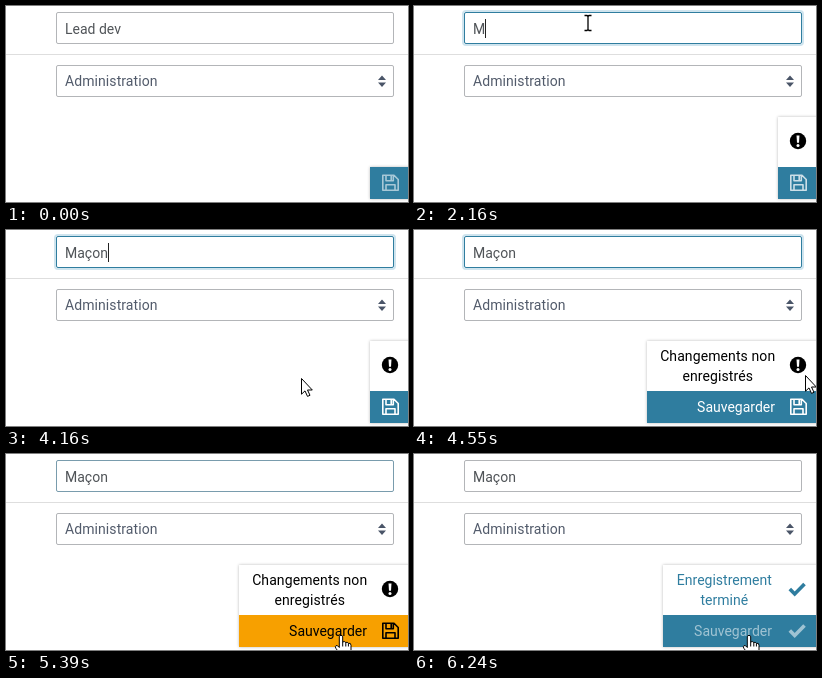
An HTML page for the animation above (7.63 s loop, 402 by 196 pixels).

```html
<!DOCTYPE html>
<html lang="fr">
<head>
<meta charset="utf-8">
<title>Formulaire</title>
<style>
  html, body { margin: 0; width: 100%; height: 100%; overflow: hidden; background: #fff; }
  svg { display: block; width: 402px; height: 196px; }
  text { font: 14px Roboto, Arial, sans-serif; white-space: pre; }
  .mid { text-anchor: middle; }
  .end { text-anchor: end; }
  .shade { filter: drop-shadow(0 0 1.5px rgba(0, 0, 0, .28)); }
</style>
</head>
<body>
<svg viewBox="0 0 402 196">
  <defs>
    <clipPath id="clip"><rect id="clipBox" y="100" width="402" height="96"/></clipPath>
  </defs>
  <path d="M0 48.5H402" stroke="#dedede"/>

  <rect id="glow" x="49" y="5" width="340" height="34" rx="3" fill="none" stroke="#cfe4ee" stroke-width="2"/>
  <rect id="field" x="50.5" y="6.5" width="337" height="31" rx="1.5" fill="#fff"/>
  <rect id="mark" x="59" y="13" width="56" height="19" fill="#0078d7"/>
  <text id="job" x="59" y="28"></text>
  <rect id="caret" y="13" width="1" height="19" fill="#222"/>

  <rect x="50.5" y="59.5" width="337" height="31" rx="1.5" fill="#fff" stroke="#b3b5b8"/>
  <text x="59" y="80" fill="#525b6b" letter-spacing=".08">Administration</text>
  <path d="M372 74L376 69.5L380 74zM372 76.5H380L376 81z" fill="#4a5568"/>

  <g class="shade">
    <rect id="panel" y="111" height="50" fill="#fff"/>
    <rect id="bar" y="161" height="32"/>
  </g>
  <g clip-path="url(#clip)">
    <g id="warn">
      <g fill="#000" letter-spacing=".1">
        <text class="mid" x="303.7" y="131">Changements non</text>
        <text class="mid" x="303.7" y="151">enregistrés</text>
      </g>
      <circle cx="384" cy="135" r="8.2"/>
      <path d="M382.5 129.5H385.5L385 136.7H383z" fill="#fff"/>
      <circle cx="384" cy="139.4" r="1.5" fill="#fff"/>
    </g>
    <g id="done" fill="#2f7d9f">
      <text class="mid" x="310.3" y="131">Enregistrement</text>
      <text class="mid" x="310.3" y="151">terminé</text>
      <path d="M375.8 135L380.7 140L390.5 130" fill="none" stroke="#2f7d9f" stroke-width="3.6"/>
    </g>
    <g id="action">
      <text id="label" class="end" y="182">Sauvegarder</text>
      <path id="disk" fill="none" stroke-width="1.6" stroke-linejoin="round"
        d="M376.8 169.3H388L392.2 173.5V184.2H376.8zM380 169.5V174.8H387.3V169.5M380 184V178.8H389V184M385.2 170V174"/>
      <path id="tick" d="M375.8 176.5L380.7 181.5L390.5 171.5" fill="none" stroke-width="3.6"/>
    </g>
  </g>

  <g id="mouse">
    <path id="arrow" d="M.5 .5V16.2L4 12.9L6.5 18.4L9 17.3L6.5 12H11.3z" fill="#fff" stroke="#000"/>
    <g id="beam" fill="none">
      <path d="M-4 -7.5H-1L0 -6.5L1 -7.5H4M0 -7V7M-4 7.5H-1L0 6.5L1 7.5H4" stroke="#fff" stroke-width="3"/>
      <path d="M-3.5 -7.5H-1L0 -6.5L1 -7.5H3.5M0 -7V7M-3.5 7.5H-1L0 6.5L1 7.5H3.5" stroke="#000" stroke-width="1.3"/>
    </g>
    <g id="hand" stroke="#000">
      <path fill="#fff" d="M-1.7 1.8Q-1.7 .4 0 .4Q1.7 .4 1.7 1.8V7Q3.4 5.8 4.8 7.5Q6.3 6.6 7.4 8.3Q10 7.6 10 10.3V15Q10 18 8 21H0Q-2 17 -5 13.5Q-6.5 11.5 -5 10.6Q-3.5 10 -1.7 12.5z"/>
      <path fill="none" d="M1.7 7V11.5M4.8 7.5V11.5M7.4 8.3V11.5"/>
    </g>
  </g>
</svg>
<script>
const LOOP = 7630;
const BLUE = [47, 125, 159], ORANGE = [247, 160, 0], GREY = [179, 181, 184];
const WHITE = [255, 255, 255], BLACK = [0, 0, 0];

// start, end and step count of each screen-refresh burst
const BURSTS = [[300, 990, 10], [1080, 1140, 2], [2160, 2400, 4], [3930, 4620, 10],
  [4700, 5080, 6], [5310, 6010, 10], [6080, 6240, 3]];

// time, x, y of the pointer tip
const PATH = [[300, 247, 159], [450, 238, 135], [610, 208, 82], [760, 183, 34], [910, 174, 17],
  [3850, 174, 17], [3930, 188, 30], [4007, 218, 67], [4160, 295, 148], [4313, 353, 151],
  [4467, 386, 147], [4543, 391, 145], [4640, 391, 145], [4700, 385, 150],
  [4852, 357, 169], [5004, 337, 181], [5080, 335, 181]];

const TYPED = [[0, 'Lead dev'], [2160, 'M'], [2400, 'Ma'], [2540, 'Maç'], [2770, 'Maço'], [2920, 'Maçon']];
const CARET = [[990, 1450], [2160, 3470], [4000, 4530], [5060, 5310]];

const el = {};
document.querySelectorAll('svg [id]').forEach(n => el[n.id] = n);

const set = (node, attrs) => {
  for (const k in attrs) node.setAttribute(k, attrs[k]);
};
const show = (node, on) => set(node, { visibility: on ? 'visible' : 'hidden' });
const ramp = (t, a, b) => Math.min(1, Math.max(0, (t - a) / (b - a)));
const mix = (a, b, k) => a + (b - a) * k;
const ease = k => k * k * (3 - 2 * k);
const blend = (a, b, k) => `rgb(${a.map((v, i) => Math.round(mix(v, b[i], k)))})`;

function snap(t) {
  for (const [a, b, n] of BURSTS) {
    if (t >= a && t <= b) {
      const step = (b - a) / (n - 1);
      return a + Math.floor((t - a) / step + 1e-6) * step;
    }
  }
  return t;
}

function pointerAt(t) {
  const i = PATH.findIndex(p => p[0] > t);
  if (i < 0) return PATH[PATH.length - 1].slice(1);
  if (i === 0) return PATH[0].slice(1);
  const [a, x, y] = PATH[i - 1], [b, u, v] = PATH[i];
  const k = ramp(t, a, b);
  return [mix(x, u, k), mix(y, v, k)];
}

function drawField(t) {
  const focus = ramp(t, 1020, 1140) * (1 - ramp(t, 5290, 5465));
  const marked = t >= 1450 && t < 2160;
  set(el.field, { stroke: blend(GREY, BLUE, focus) });
  set(el.glow, { opacity: t < 5380 ? focus : 0 });
  el.job.textContent = TYPED.filter(e => t >= e[0]).pop()[1];
  set(el.job, { fill: marked ? '#fff' : '#505458' });
  show(el.mark, marked);
  const on = CARET.some(([a, b]) => t >= a && t < b);
  show(el.caret, on);
  if (on) set(el.caret, { x: Math.round(59 + el.job.getComputedTextLength()) });
}

function drawPanel(t) {
  const saved = t >= 5770;
  const open = ease(ramp(t, 4280, 4540));
  const left = mix(364, 233, open) + 16 * ramp(t, 5700, 5850);
  const hover = ramp(t, 4790, 5000) * (1 - ramp(t, 5465, 5690));
  const ink = blend(WHITE, BLACK, hover);
  const live = mix(.58, 1, ramp(t, 2060, 2300)) - .46 * ramp(t, 5465, 5690);

  set(el.panel, { x: left, width: 404 - left });
  set(el.bar, { x: left, width: 404 - left, fill: blend(BLUE, ORANGE, hover) });
  set(el.clipBox, { x: left });
  show(el.panel, t >= 2160);
  show(el.warn, t >= 2160 && !saved);
  show(el.done, saved);
  set(el.done, { opacity: mix(.3, 1, ramp(t, 5770, 6240)) });

  set(el.action, { opacity: live });
  set(el.label, { x: saved ? 358 : 361, fill: ink });
  set(el.disk, { stroke: ink });
  set(el.tick, { stroke: ink });
  show(el.label, open > 0);
  show(el.disk, !saved);
  show(el.tick, saved);
}

function drawMouse(t) {
  const [x, y] = pointerAt(t).map(Math.round);
  const beam = y >= 6 && y < 38 && x >= 50 && x < 388;
  const hand = y >= 161 && t > 4700;
  set(el.mouse, { transform: `translate(${x} ${y})` });
  const on = t >= 300;
  show(el.beam, on && beam);
  show(el.hand, on && hand);
  show(el.arrow, on && !beam && !hand);
}

function render(time) {
  const t = snap(time);
  drawField(t);
  drawPanel(t);
  drawMouse(t);
}

const start = performance.now();
function tick() {
  render((performance.now() - start) % LOOP);
  requestAnimationFrame(tick);
}
tick();
</script>
</body>
</html>
```
